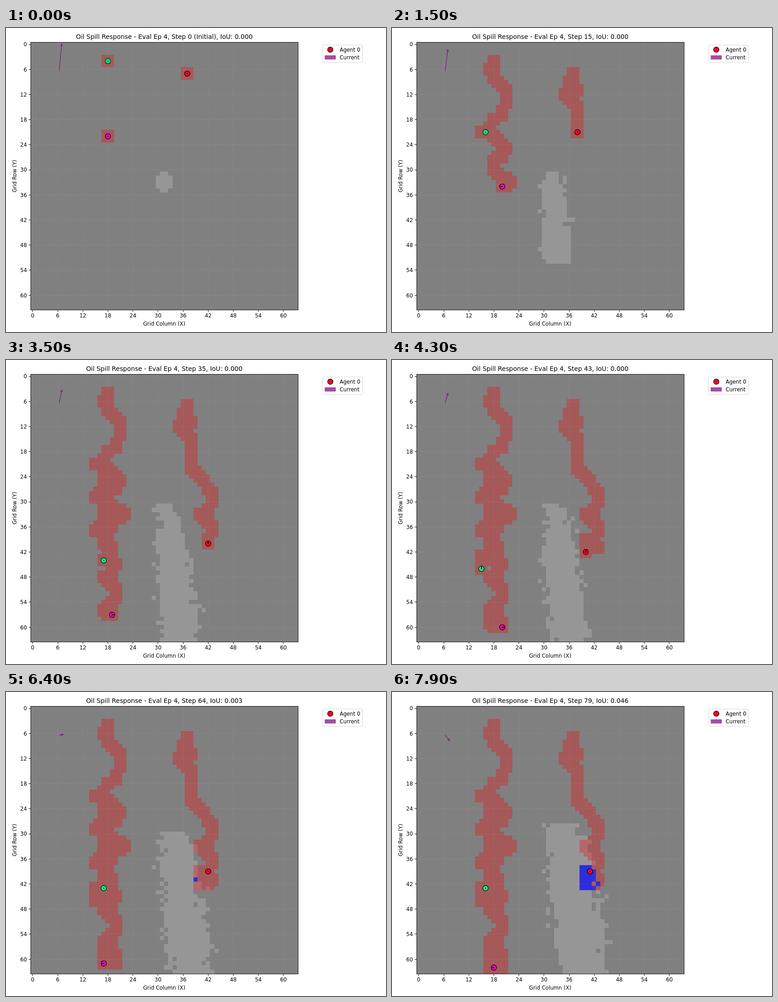
An HTML page with a canvas for the animation above (8000 ms loop, 837 by 669 pixels).

```html
<!DOCTYPE html>
<html lang="en">
<head>
<meta charset="utf-8">
<title>Oil Spill Response</title>
<style>
html, body { margin: 0; width: 837px; height: 669px; overflow: hidden; background: #fff; }
canvas { display: block; }
</style>
</head>
<body>
<canvas id="stage" width="837" height="669"></canvas>
<script>
const ctx = document.getElementById('stage').getContext('2d');
const LEFT = 54.2, TOP = 31.4, CELL = 9.203, SIZE = 64, STEPS = 80;

const lerp = (a, b, k) => a + (b - a) * k;
const wave = (s, period) => Math.sin(2 * Math.PI * s / period);
function hash(a, b, c) {
  const s = Math.sin(a * 12.9898 + b * 78.233 + c * 37.719) * 43758.5453;
  return s - Math.floor(s);
}

// Each agent follows turning points [step, column, row], then patrols around a spot.
const zigzag = [0, 8, 16].flatMap(d => [[13 + d, 15, 21 + d], [15 + d, 16, 21 + d], [18 + d, 18, 25 + d]]);
const agents = [
  {
    color: '#ff0029',
    turns: [[0, 37, 7], [2, 36, 9], [4, 38, 11], [6, 35, 12], [9, 38, 15], [14, 38, 21], [17, 38, 22],
      [23, 41, 25], [25, 43, 28], [27, 43, 30], [29, 40, 33], [32, 43, 36], [35, 42, 40], [37, 43, 41]],
    patrol: s => [41.4 + wave(s, 48), 40.5 + 1.5 * wave(s + 2, 8)]
  },
  {
    color: '#00ff8a',
    turns: [[0, 18, 4], [1, 17, 6], [3, 18, 8], [6, 21, 11], [7, 21, 13], [10, 20, 17], ...zigzag, [35, 17, 44]],
    patrol: s => [16 + wave(s, 48), 44.5 + 1.5 * wave(s + 2, 8)]
  },
  {
    color: '#ff00bf',
    turns: [[0, 18, 22], [4, 21, 25], [8, 18, 28], [10, 18, 30], [13, 22, 33], [15, 20, 34], [17, 18, 37],
      [18, 18, 39], [21, 20, 45], [23, 18, 48], [25, 17, 48], [28, 20, 51], [30, 20, 53], [33, 17, 56], [35, 19, 57]],
    patrol: s => [18.6 + 1.5 * wave(s + 2, 8), 60.4 + 1.4 * wave(s, 100)]
  }
];
function locate({ turns, patrol }, t) {
  const next = turns.findIndex(p => p[0] > t);
  if (next < 0 && t > turns.at(-1)[0]) return patrol(t - 52).map(Math.round);
  const b = turns.at(next), a = next < 0 ? b : turns[next - 1];
  const k = (t - a[0]) / (b[0] - a[0] || 1);
  return [1, 2].map(i => Math.round(lerp(a[i], b[i], k)));
}
for (const agent of agents)
  agent.path = Array.from({ length: STEPS }, (_, t) => locate(agent, t));

// The slick grows downwards, widens and drifts right, with ragged edges.
function slickAt(t) {
  const top = Math.round(31 - Math.max(0, t - 56) / 8);
  const bottom = Math.min(SIZE - 1, Math.round(35 + 1.1 * t));
  const drift = (t / 79) ** 2, spread = 6 * Math.min(1, t / 25);
  const rough = Math.min(1, t / 12) * (13 + t / 10);
  const cells = new Set();
  for (let r = top; r <= bottom; r++) {
    const u = (r - top) / (bottom - top), taper = Math.abs(2 * u - 1) ** 6;
    const left = 30 + drift * (.5 + 3.5 * u) + taper;
    const right = 33 + 6 * drift + spread * u ** .8 - taper;
    for (let c = Math.floor(left) - 3; c <= right + 3; c++) {
      const noise = (hash(c, r, Math.floor(t / 3)) - .5) ** 3 * rough;
      if (Math.min(c - left, right - c) + .5 > noise) cells.add(r * SIZE + c);
    }
  }
  return cells;
}

function visitedAt(t) {
  const cells = new Set();
  for (const { path } of agents)
    for (const [c, r] of path.slice(0, t + 1))
      for (let k = 0; k < 9; k++) cells.add((r - 1 + Math.floor(k / 3)) * SIZE + c - 1 + k % 3);
  return cells;
}

const px = c => Math.floor(LEFT + c * CELL), py = r => Math.floor(TOP + r * CELL);
const midX = c => LEFT + (c + .5) * CELL, midY = r => TOP + (r + .5) * CELL;
function block(c, r, w = 1, h = 1) {
  const x = px(c), y = py(r);
  ctx.fillRect(x, y, px(c + w) - x, py(r + h) - y);
}
function fillCells(cells, color) {
  ctx.fillStyle = color;
  for (const i of cells) block(i % SIZE, Math.floor(i / SIZE));
}
function text(str, x, y, size = 11.57, align = 'center') {
  ctx.font = size + 'px "DejaVu Sans", sans-serif';
  ctx.textAlign = align;
  ctx.fillStyle = '#000';
  ctx.fillText(str, x, y);
}
function pen(color, width) {
  ctx.strokeStyle = color;
  ctx.lineWidth = width;
}
function line(x1, y1, x2, y2) {
  ctx.beginPath();
  ctx.moveTo(x1, y1);
  ctx.lineTo(x2, y2);
  ctx.stroke();
}
function disc(x, y, color) {
  ctx.beginPath();
  ctx.arc(x, y, 5.9, 0, 7);
  ctx.fillStyle = color;
  ctx.fill();
  pen('#000', 1.2);
  ctx.stroke();
}

function drawMap(t) {
  ctx.fillStyle = '#808080';
  block(0, 0, SIZE, SIZE);
  const oil = slickAt(t), visited = visitedAt(t);
  fillCells(oil, '#969696');
  fillCells(visited, 'rgba(245,0,0,.31)');
  // Detected oil spreads out from row 41 of the searched area.
  const reach = (t - 62) / 5;
  const found = [...visited].filter(i => oil.has(i) && Math.abs(Math.floor(i / SIZE) - 41) < reach);
  fillCells(found, '#2d2ddc');
}

function drawAxes() {
  for (let n = 0; n <= 60; n += 6) {
    const x = Math.floor(midX(n)) + .5, y = Math.floor(midY(n)) + .5;
    pen('rgba(176,176,176,.5)', .7);
    ctx.setLineDash([.7, 1.15]);
    line(x, 620, x, 31);
    line(54, y, 643, y);
    ctx.setLineDash([]);
    pen('#000', .93);
    line(x, 621, x, 625);
    line(50, y, 54, y);
    text(n, midX(n), 637.3);
    text(n, 46, midY(n) + 4.4, 11.57, 'right');
  }
  ctx.strokeRect(54.5, 31.5, 589, 589);
  text('Grid Column (X)', 348.5, 654.5);
  ctx.save();
  ctx.translate(23, 326);
  ctx.rotate(-Math.PI / 2);
  text('Grid Row (Y)', 0, 0);
  ctx.restore();
}

function drawLegend() {
  ctx.beginPath();
  ctx.roundRect(697.5, 37.5, 88, 38, 2.3);
  pen('#d6d6d6', 1);
  ctx.stroke();
  disc(714.3, 47.7, '#ff0029');
  ctx.fillStyle = 'rgba(128,0,128,.7)';
  pen(ctx.fillStyle, .9);
  ctx.fillRect(702.7, 60.8, 23.1, 8);
  ctx.strokeRect(702.7, 60.8, 23.1, 8);
  text('Agent 0', 735, 51.5, 11.57, 'left');
  text('Current', 735, 69, 11.57, 'left');
}

// The current weakens, turns and reverses.
function drawCurrent(t) {
  const dx = 6 + 5 * Math.min(1, (t / 64) ** 6), dy = -62 + .84 * t + .0015 * t * t;
  const len = Math.hypot(dx, dy);
  ctx.save();
  ctx.translate(117, 95);
  ctx.rotate(Math.atan2(dy, dx));
  ctx.fillStyle = 'rgba(128,0,128,.75)';
  ctx.beginPath();
  for (const [x, y] of [[0, -.7], [len - 5.5, -.7], [len - 6.5, -3], [len, 0], [len - 6.5, 3], [len - 5.5, .7], [0, .7]])
    ctx.lineTo(x, y);
  ctx.fill();
  ctx.restore();
}

function drawAgent({ path, color }, t) {
  const [c, r] = path[t], [c0, r0] = path[Math.max(0, t - 1)];
  const x = midX(c), y = midY(r), dx = c - c0, dy = r - r0;
  disc(x, y, color);
  ctx.fillStyle = '#000';
  ctx.beginPath();
  ctx.arc(x, y, 1.2, 0, 7);
  ctx.fill();
  pen('#000', 1.8);
  if (Math.abs(dx) + Math.abs(dy) === 1) line(x, y, x + dx * 5, y - dy * 5);
}

function draw(t) {
  ctx.fillStyle = '#fff';
  ctx.fillRect(0, 0, 837, 669);
  drawMap(t);
  drawAxes();
  drawCurrent(t);
  agents.forEach(agent => drawAgent(agent, t));
  drawLegend();
  const iou = Math.max(0, t - 63) * .00288;
  text(`Oil Spill Response - Eval Ep 4, Step ${t || '0 (Initial)'}, IoU: ${iou.toFixed(3)}`, 348.7, 24.1, 13.88);
}

function tick() {
  draw(Math.floor(performance.now() / 100) % STEPS);
  requestAnimationFrame(tick);
}
tick();
</script>
</body>
</html>
```
